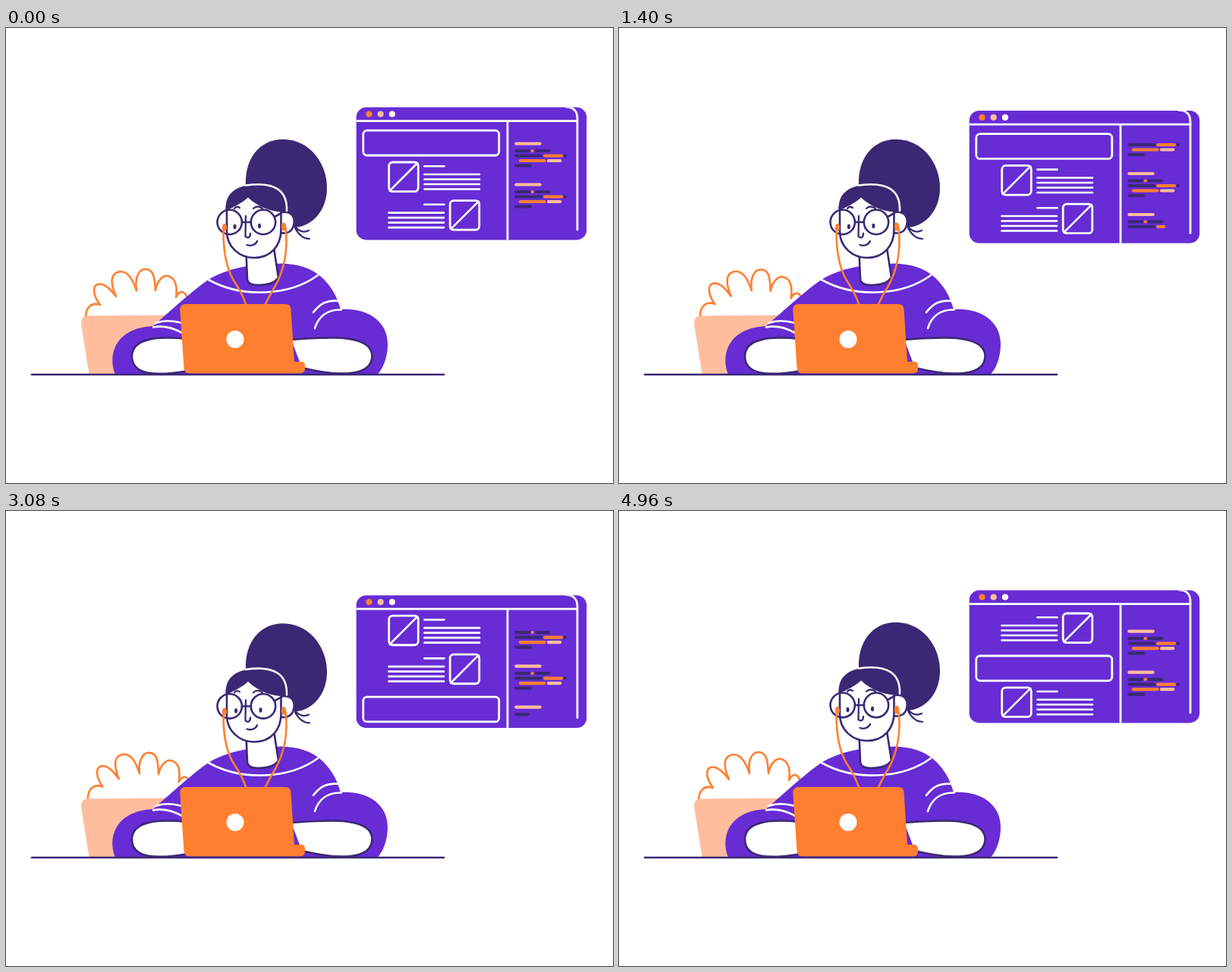
These frames come from a looping animation (800 by 600 pixels, 5000 ms). An HTML page with a canvas:

```html
<!DOCTYPE html>
<html lang="en">
<head>
<meta charset="utf-8">
<title>Working at the laptop</title>
<style>
html, body { margin: 0; width: 100%; height: 100%; overflow: hidden; background: #fff; }
canvas { display: block; }
</style>
</head>
<body>
<canvas id="stage" width="800" height="600"></canvas>
<script>
const ctx = document.getElementById('stage').getContext('2d');
const LOOP = 5000;
const PURPLE = '#672cd4', DARK = '#3b2874', ORANGE = '#ff7f30', PEACH = '#ffbd9d', WHITE = '#fff';

const fill = (d, color) => {
  ctx.fillStyle = color;
  ctx.fill(new Path2D(d));
};
const line = (d, color, width = 2.6) => {
  ctx.strokeStyle = color;
  ctx.lineWidth = width;
  ctx.stroke(new Path2D(d));
};
const shape = (d, color, edge, width) => {
  fill(d, color);
  line(d, edge, width);
};
const oval = (x, y, rx, ry, color) => {
  ctx.fillStyle = color;
  ctx.beginPath();
  ctx.ellipse(x, y, rx, ry, 0, 0, Math.PI * 2);
  ctx.fill();
};
const ring = (x, y, r) => {
  ctx.strokeStyle = DARK;
  ctx.lineWidth = 2.6;
  ctx.beginPath();
  ctx.arc(x, y, r, 0, Math.PI * 2);
  ctx.stroke();
};
const box = (x, y, w, h, r) => {
  ctx.strokeStyle = WHITE;
  ctx.lineWidth = 2.8;
  ctx.beginPath();
  ctx.roundRect(x, y, w, h, r);
  ctx.stroke();
};
const shifted = (x, y, draw) => {
  ctx.save();
  ctx.translate(x, y);
  draw();
  ctx.restore();
};

const linear = k => k;
const smooth = k => (1 - Math.cos(Math.PI * k)) / 2;
function track(keys, t, ease) {
  const i = keys.findIndex(key => key[0] > t);
  if (i < 0) return keys[keys.length - 1][1];
  const [t0, a] = keys[i - 1], [t1, b] = keys[i];
  return a + (b - a) * ease((t - t0) / (t1 - t0));
}

const NOD = [[0, 0], [880, 1.7], [1400, 0], [2500, 3.2], [3600, 0], [4120, 1.7], [5000, 0]];
const GAZE = [[0, 0], [750, 0], [1200, 1.4], [1800, 1.4], [2300, 0], [2700, 0], [3200, 1.8], [4250, 1.8], [4700, 0], [5000, 0]];

function plant(swing) {
  ctx.save();
  ctx.translate(165, 450);
  ctx.rotate(swing * 0.044);
  ctx.translate(-165, -450);
  line(`M105 382 C105 368 113 361 124 365 C114 352 114 340 121 338 C130 336 138 345 145 354
    C139 340 136 326 147 322 C160 318 167 332 172 346 C170 332 173 318 184 318
    C196 318 196 334 197 346 C199 334 206 326 213 327 C224 329 226 342 224 355
    C228 347 234 345 238 354`, ORANGE);
  ctx.restore();
  fill('M108 379.5 L230 378.5 L230 456 L109.5 456 L99.3 392 Q97.5 380 108 379.5 Z', PEACH);
}

function torso() {
  fill(`M144 456.5 C135 435 140 396 194 393 C220 370 246 346 268 331 C284 322 300 317 318 314
    L362 310.5 C386 311 402 317 414 327 C428 339 436 353 441 371 C476 369 503 386 503 417
    C503 434 497 449 490 456.5 Z`, PURPLE);
  line('M267 332 C310 356 373 354 411 326', WHITE);
  line('M197 389 C208 385 221 386 232 389 M194 394.5 C207 392 221 396 232 402', WHITE);
  line('M405 375 C414 363 424 358 439 360 M407 396 C412 380 424 371 442 371.5', WHITE);
  shape('M316.5 296 L318 330 Q318 339 332 339 Q353 339 359 329 L353 290', WHITE, DARK);
}

function head(gaze) {
  fill(`M316 208 C314 172 335 146.8 365 146.8 C400 147 423 178 423 211
    C423 240 404 262 380 263 L345 240 Z`, DARK);
  line('M381 262 C387 269 393 270 399 267 M381 264 C386 273 392 278 400 278', DARK, 2.2);
  shape('M363 243 C376 241 381 249 379.5 258 C378 268 371 272 362 270', WHITE, DARK);
  shape(`M291 235 L291 268 C291 289 308 303 327 303 C349 303 362.5 287 362.5 266 L362.5 240`, WHITE, DARK);
  fill(`M289.7 241 C288 218 303 206 335 206 C357 206 369 220 370 243
    C350 243 332 236 319 223.5 C311 231 300 236 289.7 241 Z`, DARK);
  line('M316 207.5 C354 202 371 214 370 241', WHITE);
  line('M301 238 Q304 234 308 237 M326 238 Q331 233 338 238', DARK, 2.2);
  line('M316 248 L315.5 275 C319 278 322 276 322 271 M317.5 286 C323 288 329 286 331 281', DARK, 2.3);
  oval(301.5 + gaze, 262, 2, 3.2, DARK);
  oval(334 + gaze, 261, 2, 3.2, DARK);
  ring(294.7, 256, 16.2);
  ring(339, 256, 16.2);
  line('M311 256 H323 M354 249 L363 244', DARK);
  oval(288, 263, 3.2, 5, ORANGE);
  oval(366, 262, 3.2, 5.5, ORANGE);
}

function cords(y) {
  line(`M286.5 ${264 + y} C286 ${305 + y} 294 325 304 339 Q311 350 316.5 365`, ORANGE);
  line(`M368.5 ${264 + y} C373 ${302 + y} 362 327 355 340 Q347 353 341.5 365`, ORANGE);
}

function desk() {
  shape('M238 410 C200 406 167 409 166 432 C165 459 200 459 240 452', WHITE, DARK);
  shape('M376 411 C420 408 481 402 482.5 432 C483 460 438 460 390 448', WHITE, DARK);
  fill(`M237 364 L368 364 Q375 364 375.5 371 L380 440 L389 440 Q394 440 394 445
    L394 449 Q394 455.5 387 455.5 L242 455.5 Q235 455.5 234.5 448 L229.3 372 Q229 364 237 364 Z`, ORANGE);
  oval(302, 410.5, 11.5, 11.5, WHITE);
  line('M34 457 H577', DARK);
}

function picture(x, y, textX, shortX) {
  box(x, y, 38.6, 38.6, 5);
  line(`M${x + 1} ${y + 37.6} L${x + 37.6} ${y + 1}`, WHITE);
  line(`M${shortX} ${y + 5.2} h26`, WHITE);
  for (let i = 0; i < 4; i++) line(`M${textX} ${y + 16 + i * 6.5} h72.5`, WHITE);
}
const banner = y => box(470.8, y, 179, 32.8, 5);
const pictureLeft = y => picture(504.7, y, 551.5, 551.5);
const pictureRight = y => picture(585.2, y, 504.5, 551.5);

const LAYOUTS = [
  [[banner, 135.2], [pictureLeft, 177], [pictureRight, 227.6]],
  [[pictureLeft, 131.6], [pictureRight, 182.6], [banner, 238.6]],
  [[pictureRight, 135], [banner, 191], [pictureLeft, 232.8]]
];

// Each row: vertical offset, then pieces as [from, to, color].
const CODE = [
  [0, [672.3, 703.7, PEACH]],
  [9.5, [672.3, 689.3, DARK], [693.6, 693.7, ORANGE], [699, 715.3, DARK]],
  [16, [672.3, 705, DARK], [710.2, 732, ORANGE], [736.8, 736.9, DARK]],
  [22.5, [678, 709.5, ORANGE], [715, 730.3, PEACH]],
  [29, [672.3, 691, DARK]]
];
const CODE_CYCLE = 2500, BLOCK_GAP = 54;
const SCROLL = [[0, 260.5], [100, 260.5], [500, 252], [700, 252], [1000, 242.3], [1420, 241.5],
  [1600, 227], [1750, 227], [2200, 212.7], [2465, 212.7], [2500, 206.5]];

function codeBlock(top, typed) {
  for (const [dy, ...pieces] of CODE) {
    const start = pieces[0][0] - 2;
    const pen = start + typed;
    for (const [from, to, color] of pieces) {
      if (pen <= from - 2) break;
      const end = Math.max(from + 0.1, Math.min(to, pen - 2));
      const width = Math.min(4.2, Math.max(1.5, pen - from + 2));
      line(`M${from} ${top + dy} H${end}`, color, width);
    }
    typed -= pieces[pieces.length - 1][1] + 2 - start;
    if (typed <= 0) break;
  }
}

function browser(t) {
  ctx.beginPath();
  ctx.roundRect(461.7, 104.6, 303.5, 174.8, 13);
  ctx.fillStyle = PURPLE;
  ctx.fill();
  ctx.clip();
  [ORANGE, PEACH, WHITE].forEach((color, i) => oval(478.5 + i * 15.2, 113.5, 4.1, 4.1, color));
  line('M460 122.6 H753 M661 122.6 V282', WHITE, 2.8);
  line('M738 104 C748 104 753 110 753 119 V266', WHITE, 2.8);

  for (const [draw, y] of LAYOUTS[Math.floor(t / LOOP * 3)]) draw(y);

  const u = t % CODE_CYCLE;
  const newest = track(SCROLL, u, linear);
  ctx.beginPath();
  ctx.rect(663, 146.5, 86, 130);
  ctx.clip();
  codeBlock(newest - 2 * BLOCK_GAP, Infinity);
  codeBlock(newest - BLOCK_GAP, Infinity);
  codeBlock(newest, u * 0.0945);
}

function draw(now) {
  const t = now % LOOP;
  const wave = (1 - Math.cos(t / LOOP * Math.PI * 2)) / 2;
  const nod = track(NOD, t, smooth);
  ctx.fillStyle = WHITE;
  ctx.fillRect(0, 0, 800, 600);
  ctx.lineCap = ctx.lineJoin = 'round';
  plant(wave);
  torso();
  shifted(0, nod, () => head(track(GAZE, t, smooth)));
  cords(nod);
  desk();
  shifted(0, wave * 7.5, () => browser(t));
}

let begin;
function tick(now) {
  begin ??= now;
  draw(now - begin);
  requestAnimationFrame(tick);
}
requestAnimationFrame(tick);
</script>
</body>
</html>
```
